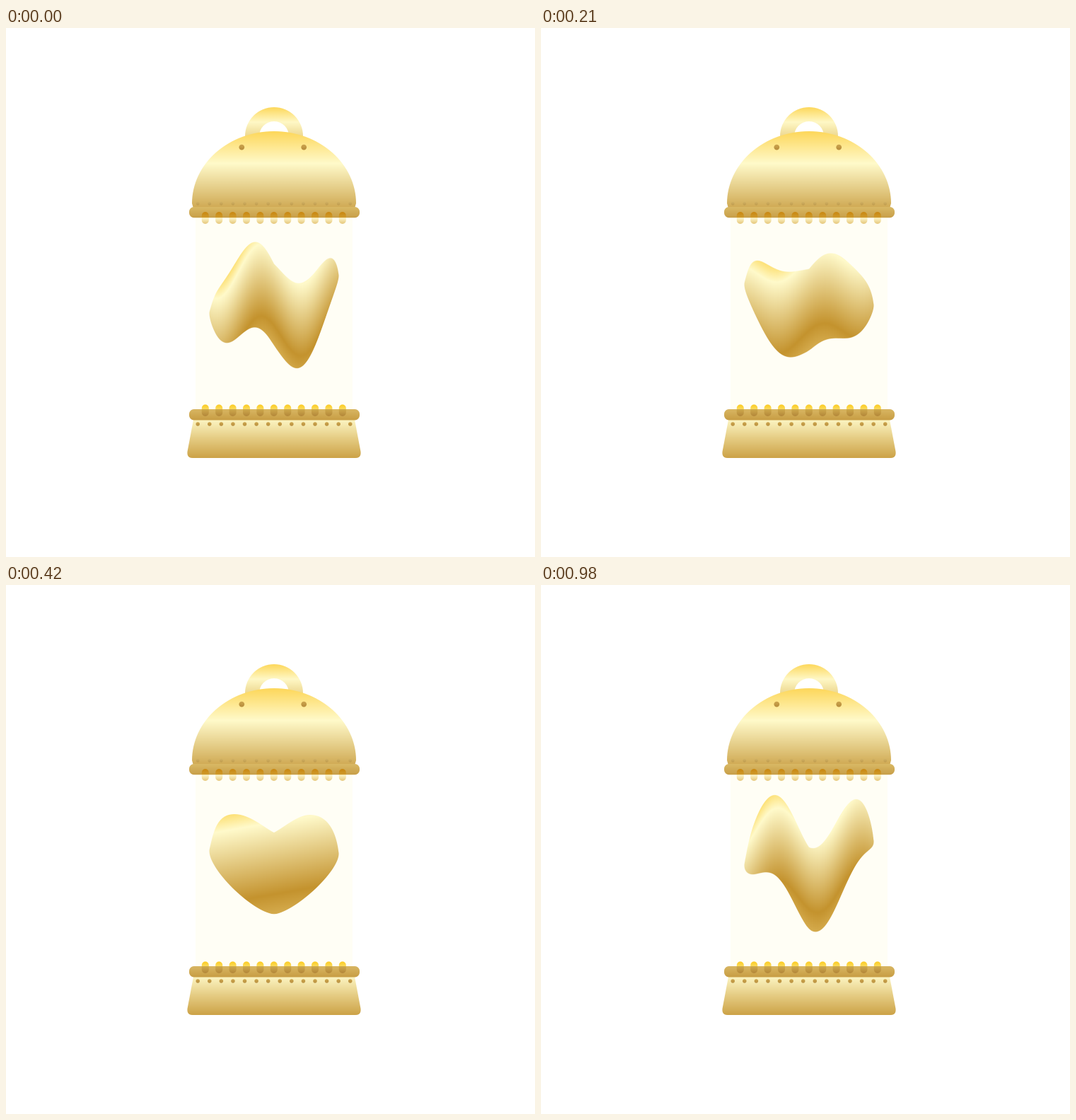
Recreate the animation shown at these times as an HTML page with a canvas. Size 748x748 px, loop 1.05 s.

```html
<!DOCTYPE html>
<html lang="en">
<head>
<meta charset="utf-8">
<title>Lantern heart</title>
<style>
html, body { margin: 0; width: 100%; height: 100%; overflow: hidden; background: #fff; }
canvas { display: block; width: 748px; height: 748px; }
</style>
</head>
<body>
<canvas id="stage"></canvas>
<script>
const SIZE = 748, SCALE = 2, LOOP = 1050, STEP = 70, WAVE = 120;

// Wave height and crest position for each step; the heart rests afterwards.
const RIPPLE = [
  [33, 419], [32, 405], [26, 379], [16, 337], [7, 286], [2, 226]
];
const RETURN = [[6, 382], [16, 456], [28, 513]];
const REST_END = 12;

function layer(canvas) {
  canvas.width = canvas.height = SIZE * SCALE;
  const g = canvas.getContext('2d');
  g.scale(SCALE, SCALE);
  return g;
}

const stage = document.getElementById('stage');
const ctx = layer(stage);
const lantern = document.createElement('canvas');
const heart = document.createElement('canvas');

function ramp(g, x0, y0, x1, y1, stops) {
  const grad = g.createLinearGradient(x0, y0, x1, y1);
  for (const [at, color] of stops) grad.addColorStop(at, color);
  return grad;
}

function down(g, top, bottom, ...colors) {
  const last = colors.length - 1;
  return ramp(g, 0, top, 0, bottom, colors.map((c, i) => [i / last, c]));
}

function bar(g, x, y, w, h, r, fill) {
  g.fillStyle = fill;
  g.beginPath();
  g.roundRect(x, y, w, h, r);
  g.fill();
}

function disc(g, x, y, r, fill) {
  g.fillStyle = fill;
  g.beginPath();
  g.arc(x, y, r, 0, 2 * Math.PI);
  g.fill();
}

function studs(g, y, r, fill) {
  for (let i = 0; i < 14; i++) disc(g, 271.2 + i * 16.58, y, r, fill);
}

function beads(g, y, h, r, fill) {
  for (let i = 0; i < 11; i++) bar(g, 276.8 + i * 19.4, y, 10, h, r, fill);
}

function drawLantern() {
  const g = layer(lantern);
  g.fillStyle = '#fff';
  g.fillRect(0, 0, SIZE, SIZE);

  // Hanging ring
  disc(g, 379, 153, 41, down(g, 112, 154, '#fdd85b', '#fff8c6', '#ecd68e'));
  disc(g, 379, 153, 21, '#fff');

  // Dome
  g.fillStyle = ramp(g, 0, 146, 0, 254,
    [[0, '#fdd75a'], [0.42, '#fffaca'], [1, '#d0aa54']]);
  g.beginPath();
  g.ellipse(379, 248, 116, 102, 0, Math.PI, 2 * Math.PI);
  g.lineTo(493, 255);
  g.lineTo(265, 255);
  g.fill();
  for (const x of [333.3, 421.2]) {
    disc(g, x, 168.6, 3.9, down(g, 164, 173, '#cfa850', '#b58a3a'));
  }
  studs(g, 248.3, 2.4, down(g, 245, 251, '#d3b568', '#bf9a4c'));

  // Glass
  g.fillStyle = '#fffef5';
  g.fillRect(268, 266, 222, 275);

  // Upper rim and beads
  bar(g, 259, 253, 241, 15.3, 7, down(g, 253, 268, '#d9b965', '#c89f49'));
  beads(g, 268, 9, [0, 0, 5, 5], down(g, 268, 277, '#fffad0', '#e6c679'));
  beads(g, 260, 8.3, [5, 5, 0, 0], down(g, 260, 268, '#c98710', '#d09a2c'));

  // Base
  g.fillStyle = down(g, 555, 608, '#fbf3c0', '#e4ca80', '#cca247');
  g.beginPath();
  g.moveTo(265, 554);
  g.lineTo(493, 554);
  g.lineTo(501.5, 599);
  g.quadraticCurveTo(502.5, 608, 494, 608);
  g.lineTo(264, 608);
  g.quadraticCurveTo(255.5, 608, 256.5, 599);
  g.fill();
  studs(g, 560, 2.8, down(g, 557, 563, '#cfa850', '#b98f3f'));

  // Lower rim and beads
  bar(g, 259, 539, 241, 15.5, 7, down(g, 539, 555, '#d8b662', '#c79c42'));
  beads(g, 532.4, 7, [5, 5, 0, 0], down(g, 532, 539, '#fbc91c', '#fbdc5c'));
  beads(g, 539, 10, [0, 0, 5, 5], down(g, 539, 549, '#cfaa4c', '#b3873a'));
}

function drawHeart() {
  const g = layer(heart);
  const shape = new Path2D(
    'M379 350 C366 344 345 324 323 324 C297 324 293 352 287.5 375 ' +
    'C286 400 340 454 372 464 Q379 466.5 386 464 C418 454 472 402 470.5 379 ' +
    'C468 355 458 325 430 325 C412 325 393 343 379 350Z');
  g.fillStyle = ramp(g, 323, 315, 353, 488, [
    [0, '#fcd755'], [0.17, '#fffacb'], [0.74, '#c4932e'], [1, '#e0bb62']
  ]);
  g.fill(shape);
}

function pose(t) {
  const step = Math.floor((t % LOOP) / STEP);
  return RIPPLE[step] || RETURN[step - REST_END] || [0, 0];
}

function draw(t) {
  const [height, crest] = pose(t);
  ctx.setTransform(1, 0, 0, 1, 0, 0);
  ctx.drawImage(lantern, 0, 0);
  const top = 318 * SCALE, tall = 154 * SCALE;
  for (let x = 284 * SCALE; x < 474 * SCALE; x++) {
    const angle = 2 * Math.PI * ((x + 0.5) / SCALE - crest) / WAVE;
    const shift = height * Math.cos(angle) * SCALE;
    ctx.drawImage(heart, x, top, 1, tall, x, top + shift, 1, tall);
  }
}

drawLantern();
drawHeart();

const start = performance.now();
function tick() {
  draw(performance.now() - start);
  requestAnimationFrame(tick);
}
tick();
</script>
</body>
</html>
```
